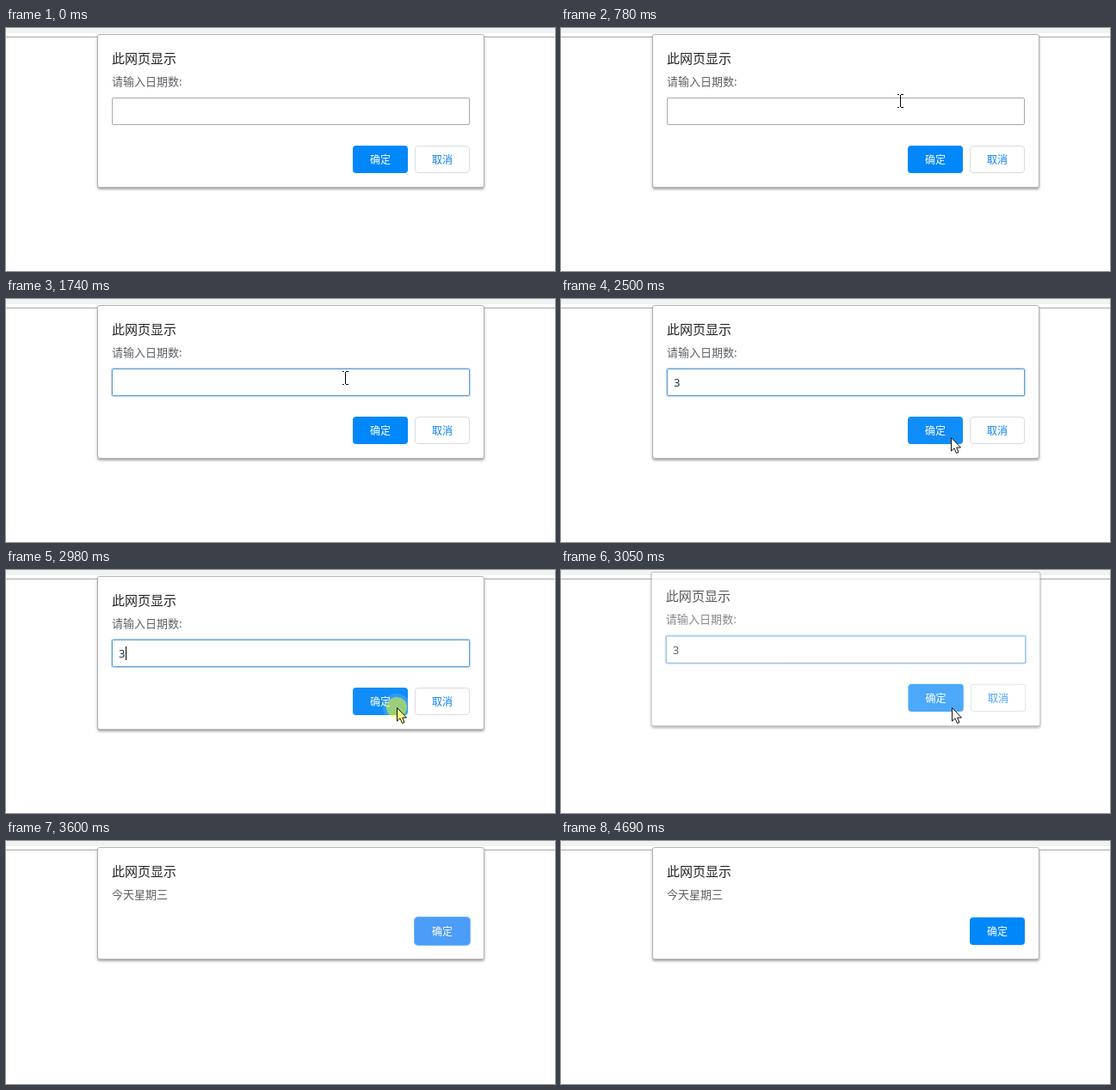
An HTML page that plays this animation: 638 by 283 pixels, repeating every 4770 ms.

```html
<!DOCTYPE html>
<html lang="zh-CN">
<head>
<meta charset="utf-8">
<style>
html, body { margin: 0; width: 100%; height: 100%; overflow: hidden; background: #fff; }
body { position: relative; font: 13px/20px "Noto Sans CJK SC", "Noto Sans CJK", "Noto Sans", sans-serif; }
div, svg { position: absolute; box-sizing: border-box; white-space: nowrap; }
#strip { left: 0; top: 0; width: 100%; height: 6px; background: #eff3f2; }
#rule { left: 0; top: 10px; width: 100%; height: 1px; background: #a9a9a9; }
.layer { left: 0; top: 0; width: 638px; height: 283px; transform-origin: 0 0; }
.panel { left: 106px; top: 7px; width: 450px; background: #fff; border: 1px solid #b4b4b4; border-radius: 3px; box-shadow: 0 2px 3px rgba(0,0,0,.36); }
.title { left: 123px; top: 25px; font-size: 15px; color: #222; }
.note { left: 123px; top: 52px; color: #5c6065; }
#field { left: 123px; top: 81px; width: 416px; height: 32px; border: 1px solid #a9a9a9; border-radius: 2px; }
#field.focus { border-color: #5f9fd8; box-shadow: 0 0 1px 1px rgba(90,160,225,.45); }
#digit { left: 131px; top: 87px; font-family: "Noto Sans", sans-serif; color: #234; }
#caret { width: 1px; height: 16px; top: 89px; background: #000; }
.button { width: 64px; height: 32px; border-radius: 4px; font-size: 12px; font-weight: 500; line-height: 32px; text-align: center; background: #0087fa; color: #fff; overflow: hidden; }
#ok { left: 403px; top: 137px; }
#ok.hover { background: #118df9; }
#cancel { left: 475px; top: 137px; line-height: 30px; background: #fff; color: #0a80f5; border: 1px solid #dadce0; }
#done { left: 475px; top: 89px; }
#done.focus { background: #4b9df7; box-shadow: 0 0 0 1px #76b8fb; }
#ripple { left: 35px; top: 7px; width: 32px; height: 32px; border-radius: 50%; background: rgba(255,255,255,.13); }
</style>
</head>
<body>
<div id="strip"></div>
<div id="rule"></div>

<div class="layer" id="ask">
  <div class="panel" style="height:179px"></div>
  <div class="title">此网页显示</div>
  <div class="note">请输入日期数:</div>
  <div id="field"></div>
  <div id="digit">3</div>
  <div id="caret"></div>
  <div class="button" id="ok"><div id="ripple"></div>确定</div>
  <div class="button" id="cancel">取消</div>
</div>

<div class="layer" id="reply">
  <div class="panel" style="height:131px"></div>
  <div class="title">此网页显示</div>
  <div class="note">今天星期三</div>
  <div class="button" id="done">确定</div>
</div>

<svg width="638" height="283" style="left:0;top:0">
  <circle id="halo" r="12" fill="#ff0" fill-opacity=".5"/>
  <path id="arrow" d="M.5 .5V16L4 12.8 6.5 18.5 9 17.4 6.6 12H11.5Z" stroke-width="1"/>
  <path id="beam" d="M-3 -7.5H-1M1 -7.5H4M-3 7.5H-1M1 7.5H4M.5 -7V7" fill="none" stroke="#000"/>
</svg>

<script>
const LOOP = 4770;
const $ = id => document.getElementById(id);
const show = (id, on) => $(id).style.visibility = on ? "inherit" : "hidden";
const within = (t, a, b) => t >= a && t < b;

// Pointer positions: [start time, x, y]
const track = [
  [300, 538, 266], [380, 462, 178], [460, 397, 105],
  [620, 396, 99], [700, 395, 90], [780, 394, 85], [910, 394, 89], [930, 394, 92],
  [2270, 398, 102], [2350, 418, 126], [2430, 444, 151], [2500, 453, 161],
  [2670, 454, 161], [2750, 454, 160],
  [3370, 470, 174], [3450, 526, 216], [3520, 586, 265]
];

function place(id, opacity, scale = 1, x = 0, y = 0) {
  const style = $(id).style;
  style.visibility = opacity ? "visible" : "hidden";
  style.opacity = opacity;
  style.transform = scale === 1 ? "none" : `matrix(${scale},0,0,${scale},${x},${y})`;
}

function drawDialogs(t) {
  if (t < 3050) place("ask", 1);
  else if (t < 3140) place("ask", .75, 1.006, -2, -5);
  else place("ask", t < 3220 ? .3 : 0, 1.016, -5.4, -16);

  if (t < 3140) place("reply", 0);
  else if (t < 3220) place("reply", .86, 1.004, -1.3, -5.6);
  else place("reply", 1);

  const typed = t >= 1890;
  $("field").className = t >= 1330 ? "focus" : "";
  show("digit", typed);
  $("caret").style.left = (typed ? 139 : 131) + "px";
  show("caret", within(t, 1330, 1740) || within(t, 1890, 2430) || within(t, 2900, 3050));
  $("ok").className = "button" + (t >= 2500 ? " hover" : "");
  show("ripple", within(t, 2900, 3050));
  $("done").className = "button" + (t < 4690 ? " focus" : "");
}

function drawPointer(t) {
  const spot = track.filter(p => p[0] <= t).pop();
  const visible = spot && t < 3600;
  const [, x, y] = spot || [0, 0, 0];
  const overField = y < 113;
  const click = within(t, 1180, 1330) || within(t, 2900, 3050);
  show("beam", visible && overField);
  show("arrow", visible && !overField);
  show("halo", visible && click);
  for (const id of ["beam", "arrow"]) $(id).setAttribute("transform", `translate(${x} ${y})`);
  const lift = overField ? 2 : 0;
  $("halo").setAttribute("transform", `translate(${x - lift} ${y - lift / 2})`);
  $("arrow").setAttribute("fill", click ? "#ffff80" : "#fff");
  $("arrow").setAttribute("stroke", within(t, 3140, 3220) ? "#0a980a" : "#111");
}

const start = performance.now();
function frame(now) {
  const t = Math.max(0, now - start) % LOOP;
  drawDialogs(t);
  drawPointer(t);
  requestAnimationFrame(frame);
}
frame(start);
</script>
</body>
</html>
```
